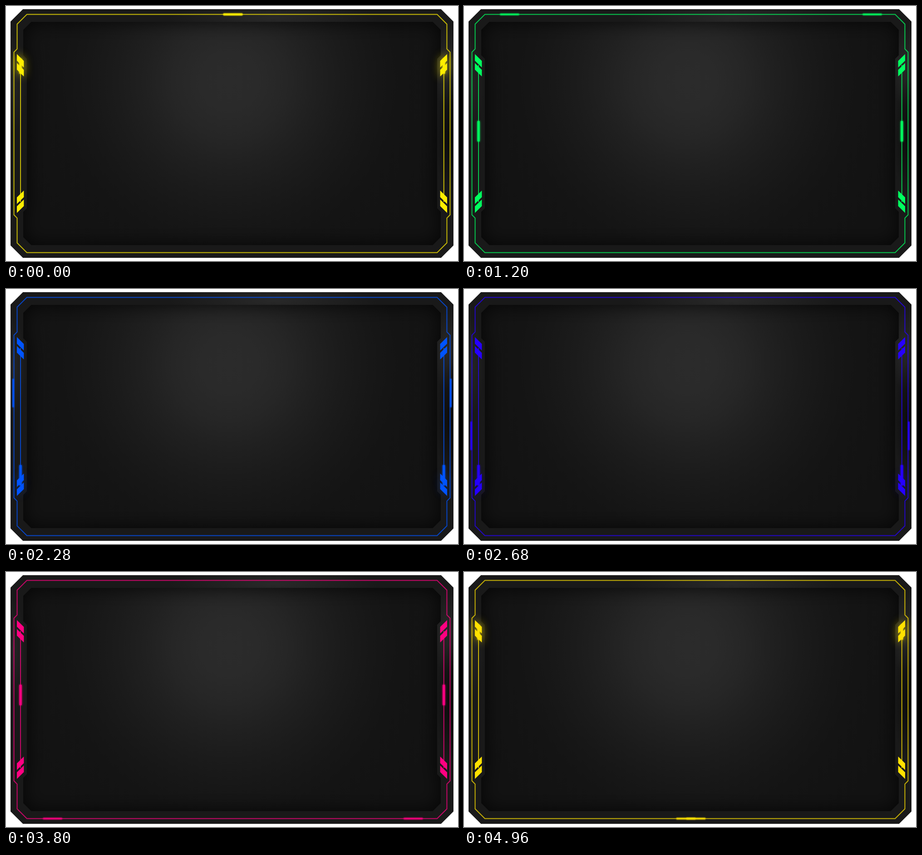
Write an HTML page with a canvas that moves like this. It is 996 px wide and 562 px high and loops after 5000 ms.

```html
<!DOCTYPE html>
<html lang="en">
<head>
<meta charset="utf-8">
<title>Neon frame</title>
<style>
html, body { margin: 0; width: 100%; height: 100%; overflow: hidden; background: #fff; }
canvas { display: block; }
</style>
</head>
<body>
<canvas id="stage" width="996" height="562"></canvas>
<script>
const W = 996, H = 562, LOOP = 5000, STEP = 40;
const LEAD = 60; // extra track beyond the centre, so pulses can cross it
const ctx = document.getElementById('stage').getContext('2d');

const clamp = (v, lo, hi) => Math.min(hi, Math.max(lo, v));

// Left half of a frame: chamfered corners and a sideways step, mirrored top to bottom.
function leftHalf({ edge, top, cut, stepY, step, from = W / 2 }) {
  const upper = [
    [from, top], [edge + cut, top], [edge, top + cut],
    [edge, stepY], [edge + step, stepY + Math.abs(step)]
  ];
  return upper.concat(upper.map(([x, y]) => [x, H - y]).reverse());
}

const closed = half => half.concat(half.map(([x, y]) => [W - x, y]).reverse());

const panel = closed(leftHalf({ edge: 10, top: 7, cut: 27.3, stepY: 100, step: 0 }));
const recess = closed(leftHalf({ edge: 38, top: 35, cut: 18, stepY: 108, step: 8 }));
const outline = closed(leftHalf({ edge: 24.5, top: 18.5, cut: 21.5, stepY: 94.7, step: -7 }));
const track = leftHalf({ edge: 23, top: 18.5, cut: 22, stepY: 95.5, step: -7, from: 500 + LEAD });

function trace(g, points, close) {
  g.beginPath();
  points.forEach(([x, y], i) => i ? g.lineTo(x, y) : g.moveTo(x, y));
  if (close) g.closePath();
}

function spot(g, x, y, rx, ry, gray, alpha) {
  g.save();
  g.translate(x, y);
  g.scale(rx, ry);
  const fill = g.createRadialGradient(0, 0, 0, 0, 0, 1);
  fill.addColorStop(0, `rgb(${gray} ${gray} ${gray} / ${alpha})`);
  fill.addColorStop(1, `rgb(${gray} ${gray} ${gray} / 0)`);
  g.fillStyle = fill;
  g.fillRect(-1, -1, 2, 2);
  g.restore();
}

function paintBackdrop() {
  const layer = document.createElement('canvas');
  layer.width = W;
  layer.height = H;
  const g = layer.getContext('2d');
  g.fillStyle = '#fff';
  g.fillRect(0, 0, W, H);

  g.save();
  trace(g, panel, true);
  g.fillStyle = '#191919';
  g.fill();
  g.clip();
  spot(g, 590, 26, 230, 34, 60, 0.45);
  spot(g, 972, 130, 40, 90, 50, 0.6);
  spot(g, 14, 170, 30, 110, 50, 0.5);
  spot(g, 982, 290, 36, 130, 0, 0.6);
  g.restore();

  trace(g, recess, true);
  const fill = g.createRadialGradient(492, 165, 0, 492, 165, 500);
  for (let r = 0; r <= 1; r += 0.125) {
    const gray = 17 + 26 * Math.exp(-((r / 0.52) ** 2));
    fill.addColorStop(r, `rgb(${gray} ${gray} ${gray})`);
  }
  g.fillStyle = fill;
  g.fill();

  // Inset shadow: only the blur of an outer ring falls inside the clip.
  g.save();
  g.clip();
  g.shadowColor = 'rgba(0,0,0,.75)';
  g.shadowBlur = 42;
  g.fillStyle = '#000';
  trace(g, recess, true);
  g.rect(-100, -100, W + 200, H + 200);
  g.fill('evenodd');
  g.restore();
  return layer;
}

function flipped(flipX, flipY, paint) {
  ctx.save();
  ctx.translate(flipX ? W : 0, flipY ? H : 0);
  ctx.scale(flipX ? -1 : 1, flipY ? -1 : 1);
  paint();
  ctx.restore();
}

function drawLine(points, color, close) {
  ctx.save();
  ctx.strokeStyle = color;
  ctx.lineWidth = 2;
  ctx.globalAlpha = 0.75;
  trace(ctx, points, close);
  ctx.stroke();
  ctx.restore();
}

function drawMarks(color, glow) {
  ctx.fillStyle = color;
  if (glow > 0) {
    ctx.shadowColor = color.replace(')', ` / ${glow})`);
    ctx.shadowBlur = 20;
  }
  for (const y of [106, 125.7]) {
    trace(ctx, [[24, y], [39.3, y + 15], [39.3, y + 29.5], [24, y + 14.5]], true);
    ctx.fill();
  }
}

// Bar sliding down and up the inner rail, hidden beyond the marks.
function drawRail(t, color, right) {
  const x = right ? 31.2 : 32;
  const turn = 2480;
  const barY = 435.5 - 309 * Math.min(1, Math.abs(t - turn) / turn);
  const glowAt = y => 1 - Math.abs(barY - y) / 30;

  drawLine([[x, 130], [x, 432]], color);
  flipped(false, false, () => drawMarks(color, glowAt(131)));
  flipped(false, true, () => drawMarks(color, glowAt(431)));

  const top = Math.max(barY - 22.5, 116), bottom = Math.min(barY + 22.5, H - 116);
  ctx.save();
  ctx.shadowColor = ctx.fillStyle = color;
  ctx.shadowBlur = 4;
  ctx.fillRect(x - 2.5, top, 5, bottom - top);
  ctx.restore();
}

// Pulse running from top centre to bottom centre, slower and longer on the side.
function drawPulse(t, color, right) {
  const sideTime = clamp(t, 1440, 3540) - 1440;
  const travel = 0.333 * (t - sideTime) + 0.236 * sideTime;
  const onSide = clamp((1125 - Math.abs(t - 2490)) / 150, 0, 1);
  const length = 42 + 21 * onSide;
  // Top and bottom pulses mirror about x = 500, the sides about the stage centre.
  const shift = right ? 4 * (1 - onSide) * Math.sign(2490 - t) : 0;

  ctx.save();
  ctx.strokeStyle = color;
  ctx.lineWidth = 4;
  ctx.filter = 'blur(1px)';
  ctx.setLineDash([length, 4000]);
  ctx.lineDashOffset = length / 2 - LEAD - travel - shift;
  trace(ctx, track);
  ctx.stroke();
  ctx.restore();
}

const backdrop = paintBackdrop();

function draw(now) {
  const t = Math.floor(now % LOOP / STEP) * STEP;
  const color = `hsl(${(56 + 360 * t / LOOP) % 360} 100% 50%)`;
  ctx.drawImage(backdrop, 0, 0);
  drawLine(outline, color, true);
  for (const right of [false, true]) {
    flipped(right, false, () => {
      drawRail(t, color, right);
      drawPulse(t, color, right);
    });
  }
}

const begin = performance.now();
function tick() {
  draw(performance.now() - begin);
  requestAnimationFrame(tick);
}
tick();
</script>
</body>
</html>
```
